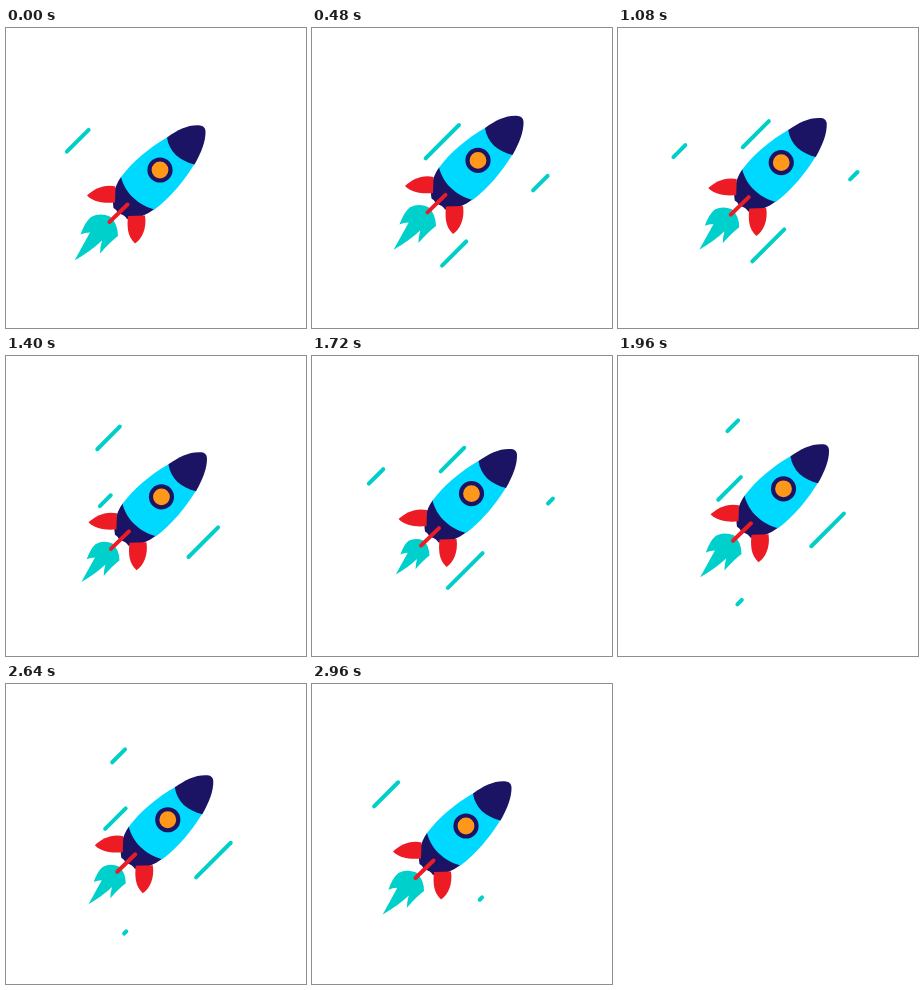
These frames come from a looping animation (300 px wide and 300 px high, 3000 ms). An HTML page:

```html
<!DOCTYPE html>
<html lang="en">
<head>
<meta charset="utf-8">
<title>Rocket</title>
<style>
  html, body { margin: 0; width: 100%; height: 100%; overflow: hidden; background: #fff; }
  svg { display: block; width: 100vw; height: 100vh; }
</style>
</head>
<body>
<svg viewBox="0 0 300 300">
  <g id="streaks" stroke="#00cfc9" stroke-width="4" stroke-linecap="round"></g>
  <g id="rocket">
    <path id="flame" fill="#00d0cb" d="M68.500 232.500 L84 204.500 Q79 204.500 74.500 206.500 Q79 194 85 189 Q94 184.500 104 188.500 Q112 196 112 208 Q104 214 94 225.500 Q94 219 96 212.500 Q85 223 68.500 232.500Z"/>
    <path fill="#1b1464" d="M115 149 C108 159 106 171 107.500 180 Q110 181 112 185 Q119 187 121 191 C130 192 140 187 148.500 181 L140 155Z"/>
    <g fill="#ed1c24">
      <path d="M109.500 158.500 C98 156 88 161 81 167.500 C88 174.500 99 175.500 109 174.500Z"/>
      <path d="M122 188 C121 198 121 208 129 215.500 C136 211 141 200 139 187.500Z"/>
    </g>
    <path fill="#00d9ff" d="M161 109.500 C143 120 127 133 115 149 C119 165 132 177 148.500 181.500 C165 169 178 153 188.500 136 L182 112Z"/>
    <path fill="#1b1464" d="M161 109.500 C172 101.500 183 96.500 194 97.500 Q199 98 199.500 103 C200 113 195 125 188.500 136.500 C174 133 163 124 161 109.500Z"/>
    <circle cx="154" cy="142" r="10.500" fill="#ff981a" stroke="#1b1464" stroke-width="4.200"/>
    <path d="M103.500 194 L121.500 176.500" stroke="#ed1c24" stroke-width="4" stroke-linecap="round"/>
  </g>
</svg>
<script>
const LOOP = 3000, STEP = 40;
const CYCLE = 662, CYCLES = 4, CARRY = 2980, LENGTH = 77;

// Each streak lies on the diagonal x + y = sum and runs down-left from x.
const streaks = [
  { sum: 184.5, x: 126, start: 543, duration: 640 },
  { sum: 244, x: 165, start: 192, duration: 640 },
  { sum: 367.7, x: 194, start: 86, duration: 585 },
  { sum: 383.5, x: 243.5, start: 354, duration: 640 }
];

const rocket = document.getElementById('rocket');
const flame = document.getElementById('flame');
const layer = document.getElementById('streaks');

for (const streak of streaks) {
  streak.line = document.createElementNS('http://www.w3.org/2000/svg', 'line');
  layer.append(streak.line);
}

// The front is fast then slow, the back mirrors it.
const lead = u => u < 0.5 ? 1.48 * u : 0.48 + 0.52 * u;
const trail = u => 1 - lead(1 - u);

// Linear rise to 1 at peak, then linear fall to 0 at end.
function triangle(t, peak, end) {
  return t < peak ? t / peak : Math.max(0, (end - t) / (end - peak));
}

// Before its first cycle a streak finishes the one left from the last loop.
function progress({ start, duration }, t) {
  const index = Math.min(CYCLES - 1, Math.floor((t - start) / CYCLE));
  return index < 0
    ? (t + CARRY - start - (CYCLES - 1) * CYCLE) / duration
    : (t - start - index * CYCLE) / duration;
}

function drawStreak(streak, t) {
  const { line, sum, x } = streak;
  const u = progress(streak, t);
  const visible = u > 0 && u < 1;
  line.setAttribute('visibility', visible ? 'visible' : 'hidden');
  if (!visible) return;
  [lead(u), trail(u)].forEach((part, i) => {
    const px = x - LENGTH * part;
    line.setAttribute('x' + (i + 1), px);
    line.setAttribute('y' + (i + 1), sum - px);
  });
}

function draw(t) {
  const lift = triangle(t % 1500, 720, 1460);
  rocket.setAttribute('transform', `translate(${18 * lift} ${-14.4 * lift})`);
  const size = 1 - 0.28 * triangle(t % 500, 275, 500);
  flame.setAttribute('transform',
    `translate(112 190) scale(${size}) translate(-112 -190)`);
  for (const streak of streaks) drawStreak(streak, t);
}

const origin = performance.now();
function tick() {
  const t = (performance.now() - origin) % LOOP;
  draw(Math.floor(t / STEP) * STEP);
  requestAnimationFrame(tick);
}
tick();
</script>
</body>
</html>
```
